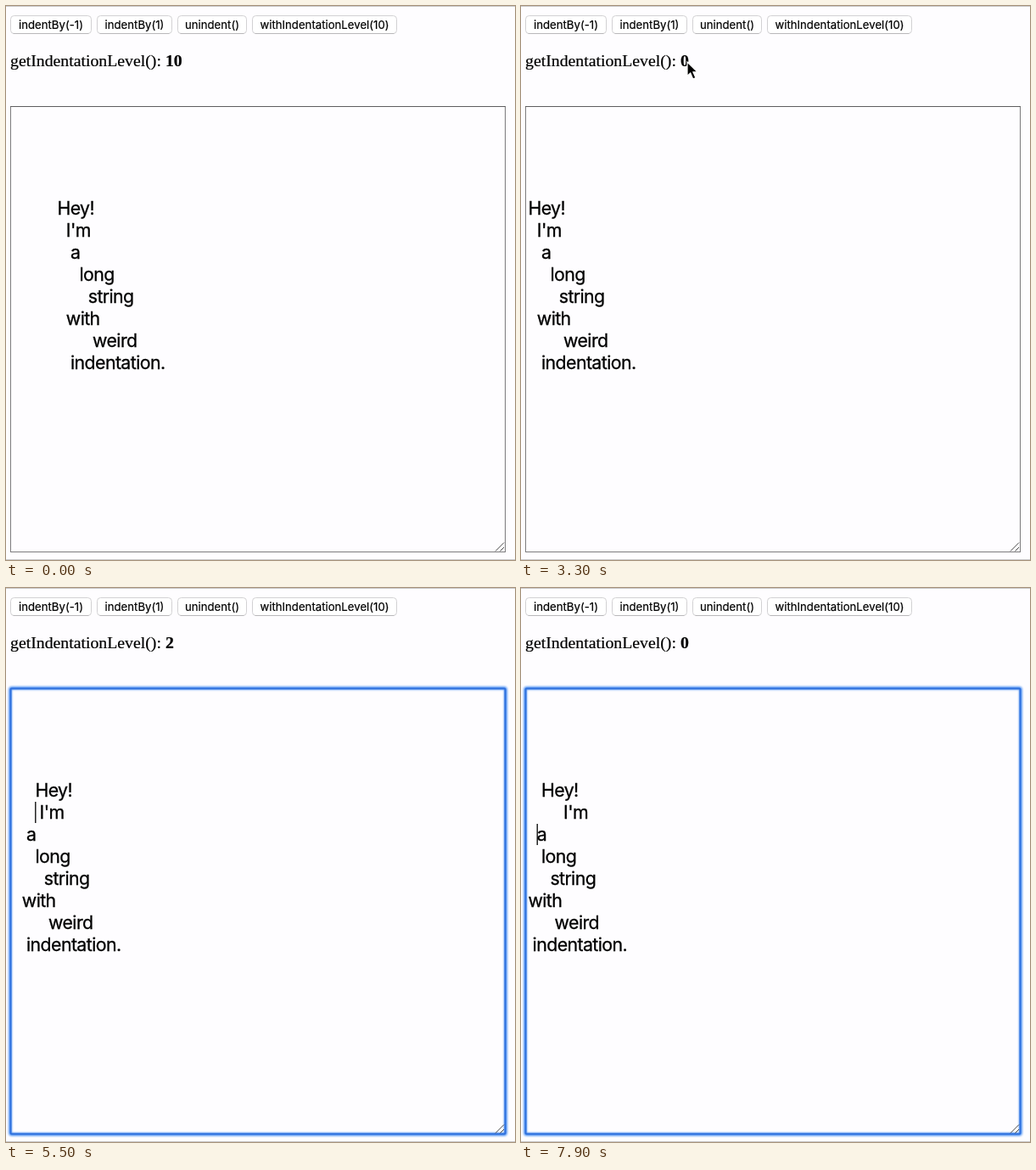
An HTML page for the animation above (8000 ms loop, 600 by 653 pixels).

```html
<!DOCTYPE html>
<html lang="en">
<head>
<meta charset="utf-8">
<title>Indentation demo</title>
<style>
html, body { margin: 0; width: 100%; height: 100%; overflow: hidden; background: #fefdff; }
svg { display: block; width: 600px; height: 653px; }
text { fill: #000; stroke: #000; stroke-width: 0.2px; white-space: pre; }
.head { font: 19.8px "Liberation Serif", Times, serif; }
.head tspan { font-weight: bold; }
.btn rect { fill: #fff; stroke: #d2d1d3; }
.btn.down rect { fill: #e6e5e8; }
.btn text { font: 13.2px Inter, sans-serif; text-anchor: middle; }
.line { font: 21.3px Inter, sans-serif; letter-spacing: -0.58px; stroke-width: 0.3px; }
</style>
</head>
<body>
<svg viewBox="0 0 600 653">
  <defs>
    <filter id="soft" x="-5%" y="-5%" width="110%" height="110%"><feGaussianBlur stdDeviation="0.8"/></filter>
  </defs>
  <rect width="600" height="653" fill="#fefdff"/>
  <path d="M0 .5H600M0 652.5H600" stroke="#cccbcd"/>
  <g id="buttons"></g>
  <text class="head" x="5" y="71">getIndentationLevel(): <tspan id="level">10</tspan></text>
  <rect x="5.5" y="118.5" width="583" height="525" fill="none" stroke="#7c7b7d"/>
  <path d="M5 118.5H589" stroke="#5e5d5f"/>
  <g id="ring" fill="none">
    <rect x="5" y="118" width="584" height="526" rx="2" stroke="#5f9cf5" stroke-width="4" filter="url(#soft)"/>
    <rect x="5.5" y="118.5" width="583" height="525" rx="1" stroke="#2f70dd" stroke-width="2"/>
  </g>
  <path d="M577 642.5L587 632.5M582.5 642.5L587 638" stroke="#444" fill="none"/>
  <g id="lines"></g>
  <path id="caret" d="M0 -12V13" stroke="#000" stroke-width="1.3"/>
  <path id="arrow" d="M0 0V16.5L3.7 13L6.7 20L9.9 18.6L6.9 11.8H12Z" stroke="#fff" stroke-width="1.2"/>
  <path id="beam" d="M-4 -9.5Q-.5 -9.5 0 -7Q.5 -9.5 4 -9.5M0 -7V7M-4 9.5Q-.5 9.5 0 7Q.5 9.5 4 9.5M-2 3H2" fill="none" stroke="#222" stroke-width="1.3"/>
</svg>
<script>
const LOOP = 8000, STEP = 100;
const SPACE = 5.2, LEFT = 8.8, TOP = 238, ROW = 26;
const NS = "http://www.w3.org/2000/svg";
const $ = id => document.getElementById(id);

function add(parent, tag, attrs, content = "") {
  const el = document.createElementNS(NS, tag);
  for (const k in attrs) el.setAttribute(k, attrs[k]);
  el.textContent = content;
  return parent.appendChild(el);
}

const buttons = [
  [5.5, 95, "indentBy(-1)"],
  [107.5, 88, "indentBy(1)"],
  [202.5, 81, "unindent()"],
  [290.5, 170, "withIndentationLevel(10)"]
].map(([x, w, label]) => {
  const g = add($("buttons"), "g", { class: "btn" });
  add(g, "rect", { x, y: 11.5, width: w, height: 21, rx: 4 });
  add(g, "path", { d: `M${x + 3} 32.5H${x + w - 3}`, stroke: "#b9b8ba" });
  add(g, "text", { x: x + w / 2, y: 27 }, label);
  return g;
});

const words = ["Hey!", "I'm", "a", "long", "string", "with", "weird", "indentation."];
const base = [0, 2, 3, 5, 7, 2, 8, 3];
const lines = words.map((word, i) =>
  add($("lines"), "text", { class: "line", y: TOP + 8 + ROW * i }, word));

// Pointer spans: [time, x, y]
const paths = [
  [[1700, 279, 83], [1800, 261, 50], [1900, 241, 22], [2000, 226, 9], [2400, 233, 19],
   [3200, 233, 19], [3300, 196, 66], [3500, 120, 148], [3800, 22, 238], [4000, 16, 252], [4600, 16, 252]],
  [[6100, 60, 262], [6300, 170, 120], [6500, 236, 22], [6700, 236, 22],
   [6800, 215, 60], [7000, 110, 190], [7300, 16, 291], [7500, 16, 291]]
];

// Single spaces typed into a row: first key, gap, count
const typed = (t, start, gap, count) =>
  t < start ? 0 : Math.min(count, 1 + Math.floor((t - start) / gap));

const within = (t, a, b) => t >= a && t < b;

function indents(t) {
  const shift = t < 2900 ? 10 : t < 6600 ? 0 : -2;
  const rows = base.map(n => n + shift);
  rows[0] += typed(t, 4500, STEP, 1) + typed(t, 4700, STEP, 4);
  rows[1] += typed(t, 5200, STEP, 8);
  rows[2] += typed(t, 7600, STEP, 1);
  return rows;
}

function caretAt(t, rows) {
  if (within(t, 3900, 5100)) return [0, rows[0]];
  if (within(t, 5100, 6500)) return [1, rows[1] - 1];
  if (t >= 7300) return [2, t < 7600 ? 1 : rows[2]];
  return null;
}

function pointerAt(t) {
  const path = paths.find(p => t >= p[0][0] && t <= p[p.length - 1][0]);
  if (!path) return null;
  const i = Math.max(1, path.findIndex(p => p[0] >= t));
  const [t0, x0, y0] = path[i - 1], [t1, x1, y1] = path[i];
  const k = (t - t0) / (t1 - t0);
  return [x0 + (x1 - x0) * k, y0 + (y1 - y0) * k];
}

function place(el, pos) {
  el.style.display = pos ? "" : "none";
  if (pos) el.setAttribute("transform", `translate(${pos[0]} ${pos[1]})`);
}

function draw(t) {
  const rows = indents(t);
  lines.forEach((el, i) => el.setAttribute("x", LEFT + SPACE * rows[i] - 0.4));
  $("level").textContent = Math.min(...rows);

  const caret = caretAt(t, rows);
  place($("caret"), caret && [LEFT + SPACE * caret[1], TOP + ROW * caret[0]]);
  $("ring").style.display = caret ? "" : "none";

  const down = within(t, 2800, 2900) || within(t, 6500, 6600);
  buttons[2].classList.toggle("down", down);

  const pos = pointerAt(t);
  const inText = pos && pos[1] > 118;
  place($("arrow"), inText ? null : pos);
  place($("beam"), inText ? pos : null);
}

const start = performance.now();
function tick() {
  const t = (performance.now() - start) % LOOP;
  draw(Math.floor(t / STEP) * STEP);
  requestAnimationFrame(tick);
}
draw(0);
requestAnimationFrame(tick);
</script>
</body>
</html>
```
